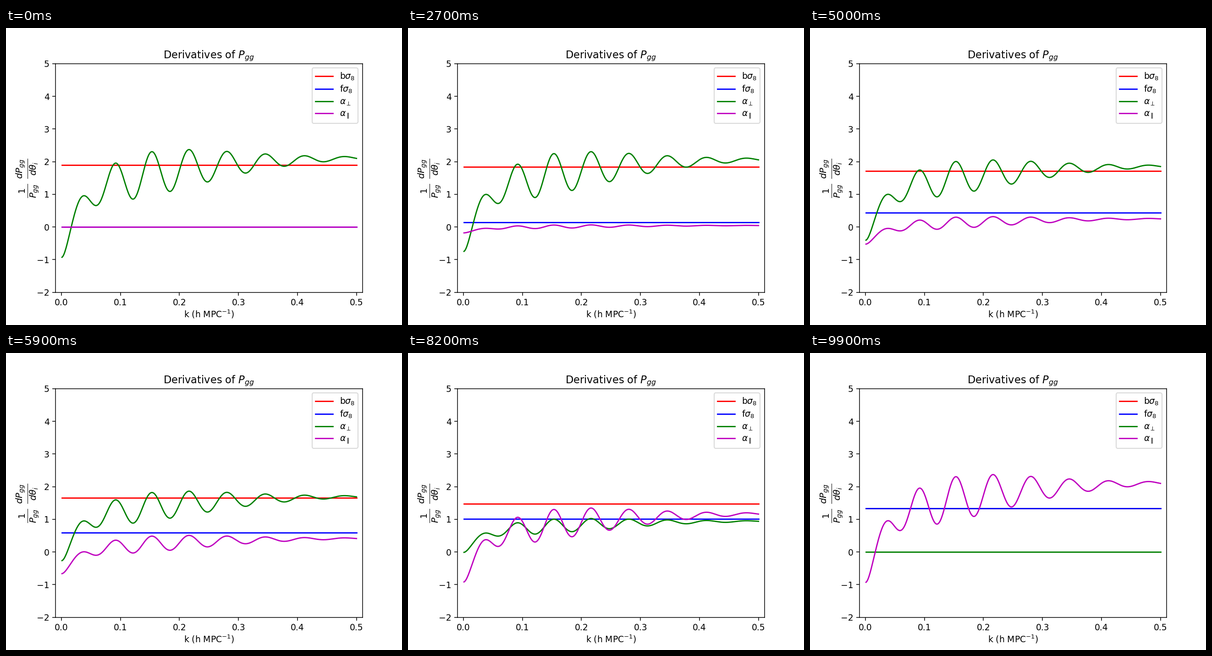
These frames come from a looping animation (864 by 648 pixels, 10000 ms). A matplotlib script:

```python
import numpy as np
import matplotlib.pyplot as plt
from matplotlib.animation import FuncAnimation

FRAMES = 100
B, F = 1.052, 0.44  # b*sigma8 and f*sigma8


def log_slope(k):
    """Negative log slope of the power spectrum: smooth rise plus damped wiggles."""
    rise = 2.2 - 1.162 * np.exp(-5.25 * k) - 1.97 / (1 + (k / 0.0206) ** 1.85)
    size = 8.8 * k * np.exp(-14 * k**1.6)
    phase = np.pi * (0.044 + 32.97 * k - 3.78 * k**2)
    return rise - size * np.cos(phase)


def derivatives(mu):
    """Log derivatives with respect to b, f and the two dilation factors."""
    m2 = mu * mu
    amp = B + F * m2
    mix = 4 * F * m2 * (1 - m2) / amp
    flat = np.ones_like(k)
    return (
        2 / amp * flat,
        2 * m2 / amp * flat,
        (1 - m2) * slope + mix,
        m2 * slope - mix,
    )


k = np.linspace(0.001, 0.5, 500)
slope = log_slope(k)

fig, ax = plt.subplots(figsize=(6.4, 4.8), dpi=135)
labels = [r"b$\sigma_8$", r"f$\sigma_8$", r"$\alpha_\perp$", r"$\alpha_\parallel$"]
lines = [
    ax.plot(k, y, color=c, label=s)[0]
    for y, c, s in zip(derivatives(0), "rbgm", labels)
]
ax.set_xlim(-0.01, 0.51)
ax.set_ylim(-2, 5)
ax.set_title("Derivatives of $P_{gg}$")
ax.set_xlabel("k (h MPC$^{-1}$)", labelpad=2)
ax.set_ylabel(
    r"$\frac{1}{P_{gg}}$ $\frac{dP_{gg}}{d\theta_i}$", fontsize=15, labelpad=-4
)
ax.legend(loc="upper right", labelspacing=0.32)


def update(n):
    for line, y in zip(lines, derivatives(n / (FRAMES - 1))):
        line.set_ydata(y)
    return lines


anim = FuncAnimation(fig, update, frames=FRAMES, interval=100, repeat=True, repeat_delay=0)
plt.show()
```
